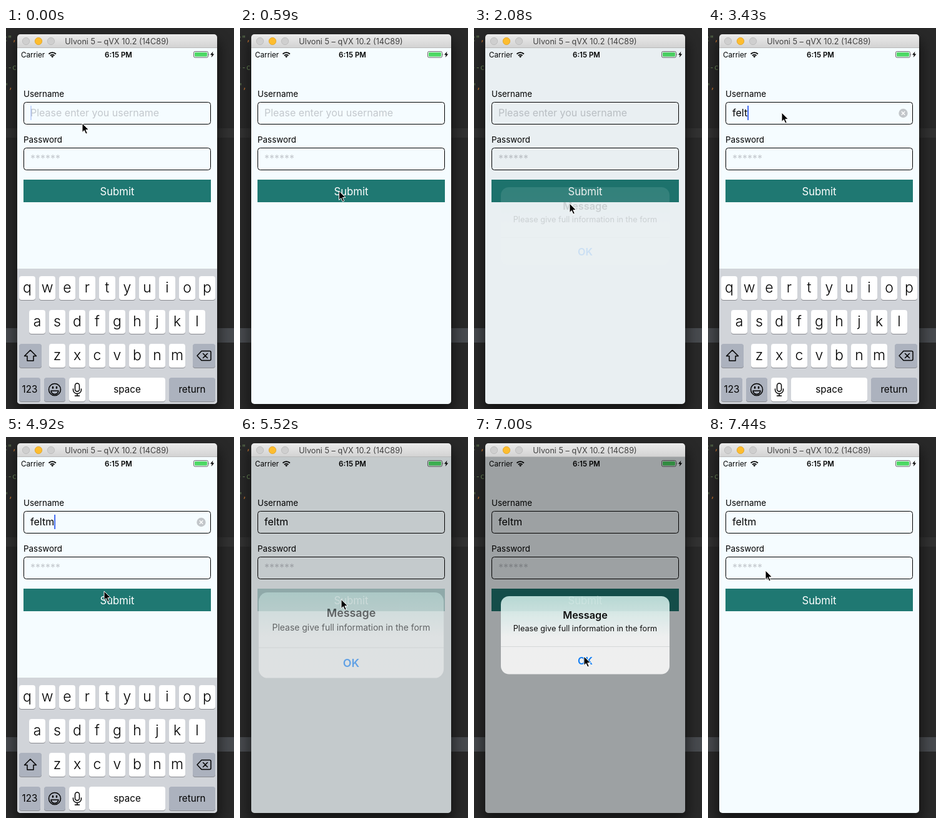
Animation of 365x608 px, one loop 8000 ms. Source, as an HTML page:

```html
<!DOCTYPE html>
<html lang="en">
<head>
<meta charset="utf-8">
<title>Login form</title>
<style>
  html, body { margin: 0; width: 100%; height: 100%; overflow: hidden; background: #292929; }
  svg { display: block; font-family: Inter, "Open Sans", sans-serif; }
  text { white-space: pre; }
  .mid { text-anchor: middle; }
  .code { font: 12px "DejaVu Sans Mono", monospace; text-anchor: end; fill: #6a8759; }
  .code tspan { fill: #cc7832; }
  .label { font-size: 13.4px; }
  .input { font-size: 16px; }
  .hint { fill: #c3c8cd; }
  .field { fill: none; stroke: #000; }
  .letter { font-size: 23px; font-weight: 300; }
  .word { font-size: 15.2px; }
  .icon { fill: none; stroke: #000; stroke-width: 1.5; stroke-linejoin: round; stroke-linecap: round; }
</style>
</head>
<body>
<svg width="365" height="608" viewBox="0 0 365 608">
  <defs>
    <linearGradient id="bar" x2="0" y2="1">
      <stop stop-color="#ebebeb"/><stop offset="1" stop-color="#d2d2d2"/>
    </linearGradient>
    <linearGradient id="glass" x2="0" y2="1">
      <stop stop-color="#c9e8e3"/><stop offset=".25" stop-color="#e1f1ef"/>
      <stop offset=".52" stop-color="#f7f8f8"/><stop offset="1" stop-color="#f8f8f8"/>
    </linearGradient>
    <filter id="blur" x="-20%" y="-20%" width="140%" height="140%"><feGaussianBlur stdDeviation="10"/></filter>
    <clipPath id="screen"><path d="M18 32H338V595a5 5 0 0 1-5 5H23a5 5 0 0 1-5-5z"/></clipPath>
  </defs>

  <!-- editor behind the window -->
  <rect width="365" height="608" fill="#292929"/>
  <rect y="160" width="365" height="15" fill="#323232"/>
  <rect y="479" width="365" height="23" fill="#484b4f"/>
  <text class="code" x="17" y="21">t"<tspan>,</tspan></text>
  <text class="code" x="17" y="67">--c</text>
  <text class="code" x="11" y="97">"<tspan>,</tspan></text>
  <rect x="14" y="18" width="328" height="596" rx="12" opacity=".5" filter="url(#blur)"/>

  <!-- title bar -->
  <path d="M18 32V15a5 5 0 0 1 5-5H333a5 5 0 0 1 5 5V32z" fill="url(#bar)"/>
  <path d="M18 31.5H338" stroke="#b9b9b9"/>
  <g stroke-width=".8">
    <circle cx="32" cy="21" r="5.7" fill="#cfcfcf" stroke="#b8b8b8"/>
    <circle cx="52" cy="21" r="5.7" fill="#fdbd2f" stroke="#dfa023"/>
    <circle cx="72" cy="21" r="5.7" fill="#cfcfcf" stroke="#b8b8b8"/>
  </g>
  <text class="mid" x="177.5" y="26" font-size="12.7" fill="#404040">Ulvoni 5 – qVX 10.2 (14C89)</text>

  <g clip-path="url(#screen)">
    <rect x="18" y="32" width="320" height="568" fill="#f5fcff"/>

    <!-- status bar -->
    <text x="24" y="46.5" font-size="11.7">Carrier</text>
    <g fill="none" stroke="#000" stroke-width="1.8">
      <path d="M68.5 41.5a8 8 0 0 1 11.4 0M70.9 44a4.8 4.8 0 0 1 6.6 0"/>
    </g>
    <path d="M74.2 47.4l-2-2.2a3 3 0 0 1 4 0z"/>
    <text class="mid" x="180" y="46.5" font-size="11.5" font-weight="600">6:15 PM</text>
    <rect x="300.5" y="37.5" width="23" height="9.5" rx="2" fill="none" stroke="#555" stroke-width=".9"/>
    <rect x="302" y="39" width="20" height="6.5" rx="1" fill="#4cd964"/>
    <path d="M324.7 40.5q1.5 1.7 0 3.4z" fill="#555"/>
    <path d="M331.5 37.5l-4.5 5.3h2.7l-1 4.2 4.6-5.6h-2.8z"/>

    <!-- form -->
    <text class="label" x="28" y="109.5">Username</text>
    <rect class="field" x="28.5" y="118.5" width="299" height="35" rx="4"/>
    <text class="input hint" id="hint" x="39" y="141">Please enter you username</text>
    <text class="input" id="name" x="39" y="141"></text>
    <rect id="caret" y="124" width="2" height="23" fill="#426bf2"/>
    <g id="clear">
      <circle cx="312.5" cy="136" r="7.2" fill="#c2c6ca"/>
      <path d="M309.8 133.3l5.4 5.4m0-5.4l-5.4 5.4" stroke="#fff" stroke-width="1.4"/>
    </g>
    <text class="label" x="28" y="182.5">Password</text>
    <rect class="field" x="28.5" y="191.5" width="299" height="35" rx="4"/>
    <text class="input hint" x="39" y="214">******</text>
    <g id="submit">
      <rect x="28" y="242" width="300" height="36" fill="#1f7872"/>
      <text class="mid" x="178" y="266.5" font-size="16.7" fill="#fff">Submit</text>
    </g>

    <g id="keyboard">
      <rect x="18" y="384" width="320" height="216" fill="#d1d4d9"/>
      <g id="keys"></g>
      <g class="icon">
        <path d="M39 514l9.5 9.5H44V531H34v-7.500H29.500z"/>
        <path d="M306 523l7-7.500h13q2 0 2 2v11q0 2-2 2H313zM315.500 519.500l7 7m0-7l-7 7"/>
        <circle cx="78" cy="577" r="9.5"/>
        <path d="M72 579h12q-1 5.500-6 5.500t-6-5.500z"/>
        <path d="M75 573v1.500M81 573v1.500" stroke-width="2.4"/>
        <rect x="110.500" y="567" width="7" height="13" rx="3.500"/>
        <path d="M107.500 576v1.500a6.500 6 0 0 0 13 0V576M114 583.500V587M110.500 587h7"/>
      </g>
    </g>

    <rect id="dim" x="18" y="32" width="320" height="568"/>
    <g id="alert">
      <rect x="43" y="254" width="270" height="124.500" rx="13" fill="url(#glass)"/>
      <path d="M43 334.500H313" stroke="#dcdedf"/>
      <g class="mid">
        <text x="178" y="290" font-size="16.300" font-weight="600">Message</text>
        <text x="178" y="310" font-size="12.700">Please give full information in the form</text>
        <text x="178" y="362.500" font-size="16.300" font-weight="600" fill="#007aff">OK</text>
      </g>
    </g>
  </g>

  <path id="pointer" d="M0 0V14.500l3.300-3.100 2.500 5.700 2.500-1.100-2.500-5.500h4.700z" stroke="#fff" stroke-width="1"/>
</svg>

<script>
const LOOP = 8000, STEP = 148.9;
const $ = id => document.getElementById(id);

// Keyboard layout
function key(x, y, w, label = '', kind = 'letter', fill = '#fff') {
  const baseline = y + (kind === 'letter' ? 25.5 : 24);
  return `<rect x="${x}" y="${y + 1}" width="${w}" height="38" rx="4" fill="#898b90"/>
    <rect x="${x}" y="${y}" width="${w}" height="38" rx="4" fill="${fill}"/>
    <text class="mid ${kind}" x="${x + w / 2}" y="${baseline}">${label}</text>`;
}
const GRAY = '#acb2be';
const letterRow = (letters, x, y) => [...letters].map((c, i) => key(x + 32 * i, y, 26, c)).join('');
$('keys').innerHTML =
  letterRow('qwertyuiop', 21, 396) + letterRow('asdfghjkl', 37, 450) + letterRow('zxcvbnm', 69, 504) +
  key(21, 504, 36, '', 'word', GRAY) + key(299, 504, 36, '', 'word', GRAY) +
  key(21, 558, 34, '123', 'word', GRAY) + key(61, 558, 34, '', 'word', GRAY) +
  key(101, 558, 26) + key(133, 558, 122, 'space', 'word') + key(261, 558, 74, 'return', 'word', GRAY);

// Tracks: [step, value...], linear between entries
const pointerTrack = [
  [0, 122, 152], [2, 157, 258], [6, 160, 262], [7, 168, 305], [8, 181, 350],
  [12, 181, 350], [13, 171, 325], [14, 153, 280], [15, 135, 205], [16, 122, 150], [17, 118, 135],
  [30, 118, 135], [31, 122, 150], [32, 138, 195], [33, 157, 246], [34, 162, 258],
  [39, 162, 260], [44, 176, 350], [47, 176, 350], [48, 158, 318], [49, 120, 255], [50, 92, 213]];
const keyboardTrack = [[2, 0], [3, 110], [4, 216], [19, 216], [20, 110], [21, 0], [33, 0], [34, 110], [35, 216]];
const alertTrack = [
  [5, 0], [6, .5], [7, 1], [11, 1], [12, .9], [13, .5], [14, .125], [15, 0],
  [36, 0], [37, .5], [38, .95], [39, 1], [46, 1], [47, .9], [48, .5], [49, .1], [50, 0]];
const scaleTrack = [[5, 1.2], [6, 1.097], [7, 1], [35, 1], [36, 1.2], [37, 1.097], [38, 1.01], [39, 1]];
const submitTrack = [[4, 1], [5, .2], [6, .31], [7, 1], [35, 1], [36, .2], [37, .31], [38, 1]];

function sample(track, s) {
  const next = track.findIndex(k => k[0] > s);
  if (next === 0) return track[0].slice(1);
  if (next < 0) return track[track.length - 1].slice(1);
  const a = track[next - 1], b = track[next];
  const p = (s - a[0]) / (b[0] - a[0]);
  return a.slice(1).map((v, i) => v + (b[i + 1] - v) * p);
}

function draw(time) {
  const s = Math.floor((time % LOOP + 8) / STEP);
  const [x, y] = sample(pointerTrack, s);
  const [alpha] = sample(alertTrack, s);
  const [scale] = sample(scaleTrack, s);
  const typed = 'feltm'.slice(0, s < 22 ? 0 : s < 23 ? 2 : s < 27 ? 4 : 5);
  const editing = s >= 20 && s < 34;

  $('name').textContent = typed;
  $('hint').style.opacity = typed ? 0 : 1;
  $('clear').style.opacity = typed && editing ? 1 : 0;
  $('caret').setAttribute('x', 39 + (typed ? $('name').getComputedTextLength() : 0));
  $('caret').style.opacity = editing ? 1 : s === 0 ? .25 : 0;
  $('submit').style.opacity = sample(submitTrack, s)[0];
  $('keyboard').setAttribute('transform', `translate(0 ${sample(keyboardTrack, s)[0]})`);
  $('dim').style.opacity = .4 * alpha;
  $('alert').style.opacity = alpha;
  $('alert').setAttribute('transform', `translate(178 316) scale(${scale}) translate(-178 -316)`);
  $('pointer').setAttribute('transform', `translate(${x} ${y})`);
}

const start = performance.now();
function tick() {
  draw(performance.now() - start);
  requestAnimationFrame(tick);
}
tick();
</script>
</body>
</html>
```
